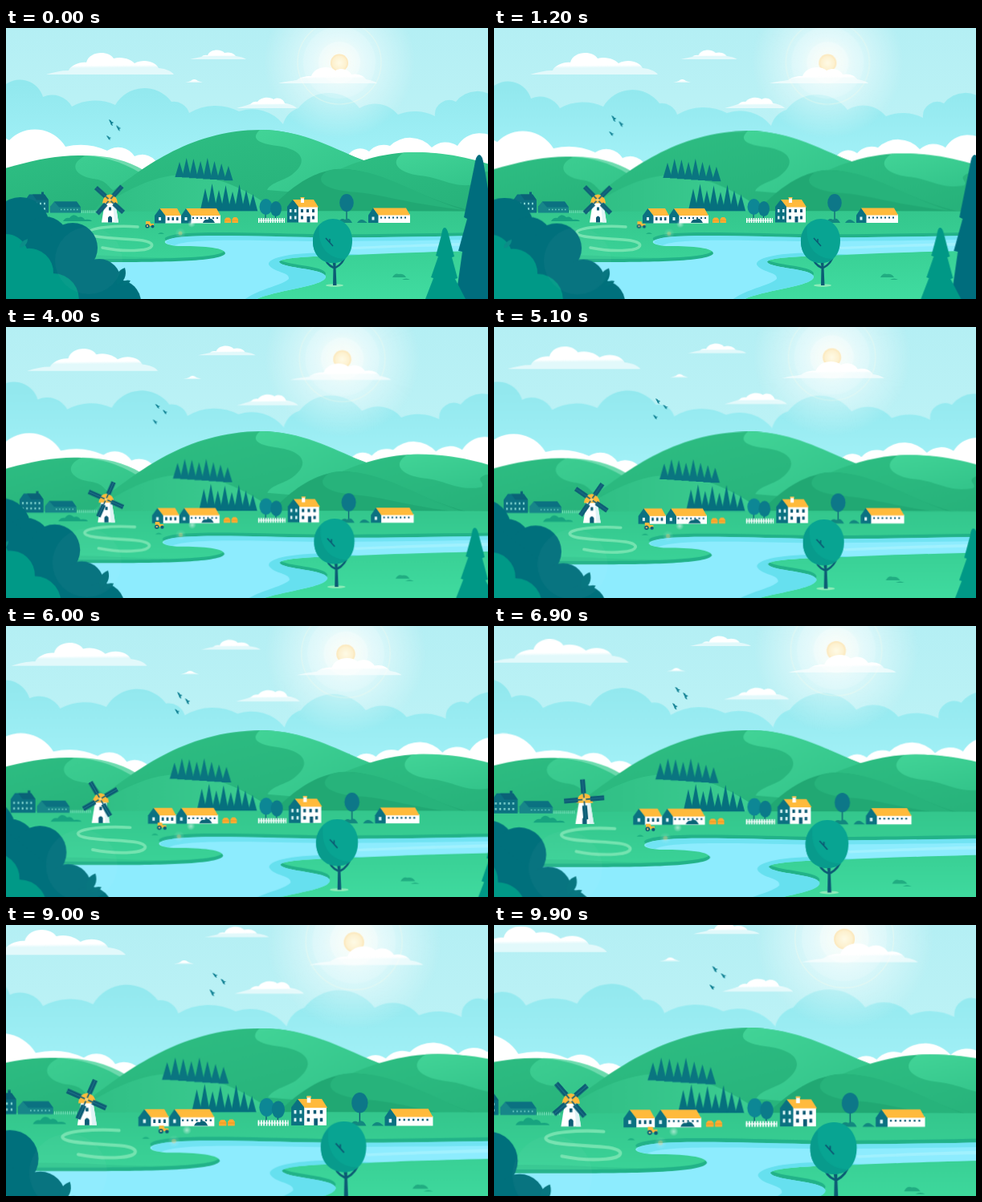
These frames come from a looping animation (600x338 px, 10 s). An HTML page:

```html
<!DOCTYPE html>
<html lang="en">
<head>
<meta charset="utf-8">
<title>Countryside by the river</title>
<style>
html, body { margin: 0; width: 100%; height: 100%; overflow: hidden; background: #b9f1f5; }
svg { display: block; width: 100%; height: 100%; }

/* camera: rest, accelerate, then a steady push-in; the .d layers add a linear parallax */
.cam { animation: zoom 10s infinite linear; }
.d { animation: drift 10s infinite linear; }
.mill { animation: spin 5s infinite linear; }
.bird { animation: flap .6s infinite alternate ease-in-out; }
@keyframes zoom {
  0%, 24% { transform: translate(0, 0) scale(1); }
  24% { animation-timing-function: cubic-bezier(.333, 0, .667, .333); }
  55% { transform: translate(-14.9px, -9.1px) scale(1.047); }
  100% { transform: translate(-58px, -35.6px) scale(1.183); }
}
@keyframes drift {
  from { transform: translate(0, 0); }
  to { transform: translate(var(--x, 0px), var(--y, 0px)); }
}
@keyframes spin {
  from { transform: rotate(42deg); }
  to { transform: rotate(-318deg); }
}
@keyframes flap {
  from { transform: scaleY(1); }
  to { transform: scaleY(.65); }
}
.teal { fill: #0b7181; }
.navy { fill: #0c5b74; }
.roof { fill: #ffba3c; }
.white { fill: #fff; }
.win { stroke: #0c5b74; fill: none; }
</style>
</head>
<body>
<svg viewBox="0 0 600 338" preserveAspectRatio="xMidYMid slice">
<defs>
  <linearGradient id="sky" x2="0" y2="1"><stop stop-color="#b4eff4"/><stop offset="1" stop-color="#c9f7f8"/></linearGradient>
  <linearGradient id="far" gradientUnits="userSpaceOnUse" y1="70" x2="0" y2="175"><stop stop-color="#92e8ee"/><stop offset="1" stop-color="#a4f2f8"/></linearGradient>
  <linearGradient id="hill" x2="1" y2="1"><stop stop-color="#2fc084"/><stop offset="1" stop-color="#23ab76"/></linearGradient>
  <linearGradient id="lit" x2="1" y2="1"><stop stop-color="#42d497"/><stop offset="1" stop-color="#30c188"/></linearGradient>
  <linearGradient id="low" x2="1" y2="0"><stop stop-color="#2dbb82"/><stop offset="1" stop-color="#3fd094"/></linearGradient>
  <linearGradient id="land" gradientUnits="userSpaceOnUse" y1="229" x2="0" y2="338"><stop stop-color="#34c78d"/><stop offset="1" stop-color="#40dca0"/></linearGradient>
  <linearGradient id="puff" x2=".06" y2="1"><stop offset=".6" stop-color="#fff"/><stop offset=".72" stop-color="#fff" stop-opacity=".6"/></linearGradient>
  <radialGradient id="glow"><stop stop-color="#fffdf0" stop-opacity=".95"/><stop offset=".35" stop-color="#fff" stop-opacity=".55"/><stop offset="1" stop-color="#fff" stop-opacity="0"/></radialGradient>
  <radialGradient id="disc"><stop stop-color="#fffbe6"/><stop offset=".75" stop-color="#fdf1cf"/><stop offset="1" stop-color="#fce6b8"/></radialGradient>
  <radialGradient id="spark"><stop stop-color="#fff" stop-opacity=".55"/><stop offset="1" stop-color="#fff" stop-opacity="0"/></radialGradient>
  <path id="bird" fill="#0f7f92" d="M-3-4Q0-3 .5-1Q2-1 3 0Q1 .5 1 1.500L2 4Q-1 3-1 .5Q-2-1-3-4Z"/>
  <path id="river" d="M700 257L600 259C520 260 440 262 380 261C320 260 250 257 215 261C192 264 192 270 215 272C240 272 272 273 273 281C270 291 200 292 130 292L40 292V400H290L312 338C340 326 398 322 398 310C396 300 345 300 340 292C340 284 420 284 480 281Q540 279 700 275Z"/>
</defs>

<rect width="600" height="338" fill="url(#sky)"/>

<g class="cam">
  <g class="d" style="--y:17px" fill="url(#far)">
    <path d="M-40 260V80A30 30 0 0 1 0 70A30 30 0 0 1 46 86A28 28 0 0 1 82 98A60 60 0 0 1 136 96A42 42 0 0 1 206 92A20 20 0 0 1 228 106A64 64 0 0 1 290 104A50 50 0 0 1 345 120L400 260Z"/>
    <path d="M300 260L345 120A28 28 0 0 1 364 100A47.500 47.500 0 0 1 440 100A37 37 0 0 1 488 108A55 55 0 0 1 534 110A18 18 0 0 1 560 92A34 34 0 0 1 612 90A34 34 0 0 1 660 110V260Z"/>
  </g>

  <g class="d" style="--x:3px;--y:1px">
    <circle cx="415" cy="43" r="95" fill="url(#glow)"/>
    <circle cx="415" cy="43" r="45" fill="#fff" opacity=".14"/>
    <circle cx="415" cy="43" r="52" fill="none" stroke="#fffbe8" stroke-opacity=".3" stroke-width="1.200"/>
    <circle cx="415" cy="43" r="26" fill="#fff" opacity=".25"/>
    <circle cx="415" cy="43.500" r="11" fill="url(#disc)"/>
  </g>

  <g fill="url(#puff)">
    <path class="d" style="--x:-42px" d="M50 58C60 55 68 53 78 53C80 47 92 42 100 43C104 28 128 28 134 38C146 35 156 40 160 44C172 38 186 42 190 50C200 51 206 54 209 58Z"/>
    <path class="d" style="--x:34px" d="M339 69C350 66 356 66 362 65C368 60 376 60 380 60C384 48 402 46 410 53C420 48 428 54 430 58C438 56 446 60 448 64C455 65 460 67 462 69Z"/>
    <path class="d" style="--x:30px" d="M229 39Q238 37 243 36Q246 33 251 34C254 26 268 26 272 31C280 29 285 33 286 35Q295 36 299 39Z"/>
    <path d="M223 68Q228 67 230 66Q234 62 239 66L245 68Z"/>
    <path class="d" style="--x:2px" d="M287 100Q298 97 304 95Q308 91 313 92C318 85 330 86 333 89C340 85 346 90 347 94Q357 95 362 100Z"/>
  </g>

  <g class="d white" style="--y:18px">
    <path d="M-40 260V150A30 30 0 0 1 4 140A44.500 44.500 0 0 1 74 148A80 80 0 0 1 126 153A24 24 0 0 1 160 160A22 22 0 0 1 190 172L260 260Z"/>
    <path d="M400 260L425 160A18 18 0 0 1 452 154A24 24 0 0 1 478 147A36 36 0 0 1 530 149A26 26 0 0 1 562 147A32 32 0 0 1 616 145A30 30 0 0 1 660 160V260Z"/>
  </g>

  <g class="d" style="--x:152px;--y:-42px">
    <g transform="translate(131 118)"><use href="#bird" class="bird"/></g>
    <g transform="translate(140 125)"><use href="#bird" class="bird" style="animation-delay:-.25s"/></g>
    <g transform="translate(128 137)"><use href="#bird" class="bird" style="animation-delay:-.4s"/></g>
  </g>

  <g class="d" style="--y:11.500px">
    <path fill="url(#hill)" d="M-60 260V196C-20 180 40 159 90 159C145 159 190 185 250 260Z"/>
    <path fill="url(#lit)" opacity=".75" d="M100 159C78 168 84 184 108 188C135 191 120 205 160 212L225 232C195 184 155 159 100 159Z"/>
    <path fill="url(#hill)" d="M80 260L130 205C165 180 225 127 318 127C365 127 405 150 440 163C480 178 520 210 580 260Z"/>
    <path fill="url(#lit)" d="M316 127C304 138 314 144 338 147C372 152 375 168 357 182C348 190 330 192 325 202L420 210 452 168C410 152 372 127 316 127Z"/>
    <path fill="url(#hill)" d="M370 260L395 186C430 167 470 155 508 155C555 155 600 170 680 195V260Z"/>
    <path fill="url(#lit)" d="M495 155.500C475 168 490 181 515 184C545 187 555 200 585 195C592 190 575 186 590 180Q610 177 630 180C585 163 545 153 495 155.500Z"/>
    <path fill="#21a873" d="M300 260C350 195 385 176 420 176C470 178 520 217 590 230V260Z"/>
    <path fill="#27b37b" d="M400 178C380 192 400 203 438 205C470 208 495 218 570 227C515 211 470 177 420 176Q410 175 400 178Z"/>
  </g>

  <g class="d" style="--y:4px">
    <path fill="url(#low)" d="M80 250C140 205 180 184 220 183C270 184 310 205 365 250Z"/>
    <g id="frontPines" fill="#06707e"></g>
  </g>
  <g class="d" style="--y:8px" id="rearPines" fill="#0a7580"></g>

  <path fill="url(#land)" d="M-60 230Q270 227 660 229V420H-60Z"/>
  <path fill="#2fc08b" opacity=".5" d="M40 292H130C200 292 268 291 273 281Q230 290 130 284Q80 282 40 284Z"/>

  <!-- left farm -->
  <g transform="translate(-2 1.500)">
    <path class="teal" d="M26 229V213L31 206H50L55 213V229Z"/>
    <path fill="#0a6277" d="M40 213L35 206H50L55 213ZM46 203h3v5h-3Z"/>
    <path d="M29 217.500H54M29 224H54" stroke="#7fd3cf" stroke-width="2.500" stroke-dasharray="2 3" fill="none"/>
    <path fill="#178689" d="M57 229V221L62 215H90L95 222V229Z"/>
    <path class="teal" d="M62 215H90L95 222H68Z"/>
    <path d="M70 225H93" stroke="#6fcdc6" stroke-width="1.500" stroke-dasharray="1.500 2.500"/>
    <path d="M96 227.500H120" stroke="#7ddfbd" stroke-width="3.500" stroke-dasharray="1 1.300"/>
  </g>
  <path fill="#17a37f" d="M71 241Q74 236 79 237Q84 230 90 236Q95 234 98 239Q105 238 107 241Z"/>

  <!-- windmill -->
  <g transform="translate(-1 .5)">
    <path class="white" d="M120 242L124 217H137L141 242Z"/>
    <path fill="#dff3f5" d="M134 217H137L141 242H136Z"/>
    <path class="roof" d="M121 218Q122 208 130.500 207Q139 208 140 218Z"/>
    <path class="navy" d="M128 242V236Q130.500 232 133 236V242ZM129 223h3v4h-3Z"/>
    <g transform="translate(130 214)">
      <g class="mill" id="blades"></g>
      <circle r="2" fill="#ffcf6c"/>
    </g>
  </g>

  <path fill="none" stroke="#7fe7b6" stroke-width="3.500" stroke-linecap="round" opacity=".85" d="M164 248C138 246 104 249 103 255C103 263 150 262 170 265C188 268 184 276 166 277Q145 279 120 274"/>

  <!-- village -->
  <g transform="translate(0 1)">
    <g id="barns"></g>
    <path class="win" stroke-width="4" stroke-dasharray="2.500 3" d="M201 237H217"/>
    <path class="win" stroke-width="2" stroke-dasharray="2 3" d="M232 236H265M466 235.500H501"/>
    <path fill="#0a6477" d="M245 242Q247 237 251 238Q256 234 260 242Z"/>
    <path fill="#ffac32" d="M272 242V238L274 235.500H278L280 238V242ZM281.500 242V237.500L283.500 235H287L289 237.500V242Z"/>
    <path stroke="#e0921e" stroke-width=".7" d="M272 239H280M281.500 239H289"/>

    <g stroke="#0c5b74" stroke-width="1.200"><path d="M323 225V241M335.500 225V241M424 215V241"/></g>
    <ellipse cx="323.500" cy="222" rx="8" ry="10" fill="#0d8795"/>
    <ellipse cx="336" cy="224.500" rx="7" ry="9.500" fill="#0b7b8a"/>
    <ellipse cx="424" cy="217" rx="8.800" ry="11" fill="#0d7788"/>
    <path stroke="#fff" stroke-width="6" stroke-dasharray="1.600 1.300" d="M314 239H347"/>
    <path stroke="#fff" d="M314 239H347"/>
    <path fill="#12877f" d="M413 242Q417 235 422 238Q427 234 431 242ZM437 242Q441 236 446 239L450 242Z"/>
    <path class="teal" d="M350 241.500V222L357 213 365 222V241.500Z"/>
    <path class="white" d="M364 221H388V241.500H364Z"/>
    <path class="roof" d="M357 213H383L389 222.500H364.500Z"/>
    <path class="white" d="M367 210h4v7h-4Z"/>
    <path class="roof" d="M366.500 210h5v1.500h-5Z"/>
    <path stroke="#d9f4f5" stroke-width="4" stroke-dasharray="2.500 3.500" d="M353 227H363M353 235.500H363"/>
    <path class="win" stroke-width="4" stroke-dasharray="3 4" d="M367 227H387M367 235.500H374M381 235.500H387"/>
    <path class="navy" d="M374.500 234h4v7.500h-4Z"/>
  </g>

  <!-- tractor -->
  <g class="d" style="--x:37px;--y:2px">
    <path class="roof" d="M174 245V241H179L180 244H184V247H174Z"/>
    <circle class="navy" cx="176" cy="247" r="2.600"/><circle class="navy" cx="182.500" cy="247.500" r="2"/>
    <circle fill="#ffd982" cx="176" cy="247" r="1"/>
  </g>
  <path fill="#1fb182" d="M189 257Q193 253 197 257Z"/>

  <!-- river -->
  <use href="#river" y="-4" fill="#22b288"/>
  <use href="#river" fill="#8decfe"/>
  <g fill="#66e0ef">
    <path d="M440 283C370 276 325 285 327 295C332 305 354 304 352 313C340 324 302 326 286 350H306L312 338C340 326 398 322 398 310C396 300 345 300 340 292C340 286 390 284 440 283Z"/>
    <path opacity=".7" d="M700 257L600 259C520 260 440 262 380 261C320 260 250 257 215 261C196 264 194 269 210 271C230 262 300 265 380 266Q500 266 700 262Z"/>
  </g>
  <path fill="#aaf4ff" opacity=".7" d="M700 266C600 266 500 270 430 273L432 276C520 272 600 271 700 270Z"/>
  <path fill="#21ac81" d="M481 311Q484 305 489 307Q495 306 498 311ZM493 314Q498 311 503 314Z"/>

  <!-- near tree -->
  <g transform="translate(2 2)">
    <ellipse cx="407" cy="319" rx="11" ry="1.800" fill="#8cebb8"/>
    <path d="M405 319L405.500 296 403.500 284H408.500L408.500 296 409.500 319Z" class="navy"/>
    <path fill="none" stroke="#0c5b74" stroke-width="2.500" d="M394 281Q396 293 406 297M421 280Q418 292 408 297"/>
    <path fill="#08a492" d="M405 236C419 236 429 248 429 263C429 281 419 291 405 291C391 291 380 281 380 264C380 248 391 236 405 236Z"/>
    <path fill="#089b8c" d="M388 245C381 251 380 258 380 264C380 281 391 291 405 291Q414 291 420 286C399 286 385 270 388 245Z"/>
    <path fill="none" stroke="#0c5b74" stroke-width="1.500" d="M396 260L405 270M401 265L401 261"/>
  </g>

  <!-- conifers -->
  <g class="d" style="--x:78px">
    <path fill="#006d7d" d="M589 158Q593 158 595 172L606 235 602 236 613 280 609 281 624 420H548L568 279 563 278 574 238 570 236 583 172Q585 158 589 158Z"/>
    <path fill="#009886" d="M546 249Q549 249 551 258L558 285 555 286 562 312 559 313 572 338 580 420H508L522 338 532 312 529 311 538 285 535 284 542 258Q543 249 546 249Z"/>
  </g>

  <!-- near bushes -->
  <g class="d" style="--x:-41px;--y:5px">
    <g fill="#00707c">
      <circle cx="18" cy="247" r="36"/>
      <circle cx="48" cy="265" r="30"/>
      <circle cx="83" cy="274" r="31"/>
      <circle cx="116" cy="315" r="27"/>
      <circle cx="140" cy="342" r="28"/>
      <path d="M-60 225L20 230 95 290 150 345V420H-60Z"/>
    </g>
    <path fill="#009987" d="M-60 420V266A36 36 0 0 1 -2 257A28 28 0 0 1 26 275A30 30 0 0 1 59 306A32 32 0 0 1 90 345V420Z"/>
    <path fill="#00727c" d="M138 320C135 308 140 302 148 299C151 309 147 317 138 320ZM141 321Q146 313 155 315Q151 323 141 321Z"/>
    <path fill="#0b8d88" d="M17 274Q17 266 27 263Q27 272 17 274Z"/>
  </g>

  <!-- lens flare -->
  <g class="d" style="--x:7px;--y:4px">
    <circle cx="103" cy="290" r="42" fill="#fff" opacity=".03"/>
    <circle cx="231" cy="244" r="5" fill="url(#spark)"/>
    <circle cx="217" cy="256" r="7" fill="url(#spark)" opacity=".4"/>
    <circle cx="217" cy="256" r="2.500" fill="#ffc46b" opacity=".3"/>
  </g>
</g>
</svg>
<script>
const $ = id => document.getElementById(id);

// row of pines: evenly spaced, one tip height each; the ground falls by slope per tree
function pines(id, x, gap, base, slope, half, tips) {
  $(id).innerHTML = tips.map((tip, i) => {
    const cx = x + gap * i, foot = base + slope * i;
    return `<path d="M${cx - half} ${foot}L${cx} ${tip}L${cx + half} ${foot}Z"/>`;
  }).join('');
}
pines('rearPines', 216, 8.7, 186, .6, 5.6, [167, 162, 163, 166, 162, 166, 169, 172]);
pines('frontPines', 248, 8.5, 229, .3, 6.5, [200, 194, 202, 196, 204, 195, 202, 207]);

// long barn: dark gable on the left, roof and white wall to the right
const barn = (x, gable, len, y) => `<g transform="translate(${x} ${y})">
  <path class="white" d="M${gable} 8H${len}V18.500H${gable}Z"/>
  <path class="teal" d="M0 18.500V9L${gable / 2} 0 ${gable + .5} 9V18.500Z"/>
  <path class="roof" d="M${gable / 2} 0H${len - 5}L${len} 9H${gable + .5}Z"/>
  <path fill="#d9f4f5" d="M${gable / 2 - 1.5} 11h3v4h-3Z"/></g>`;
$('barns').innerHTML = barn(185, 13, 33, 224) + barn(218, 12, 49, 224) + barn(451, 12, 52, 223.5);

$('blades').innerHTML = [0, 90, 180, 270].map(a =>
  `<g transform="rotate(${a})"><path d="M0 0V-8" stroke="#0c5b74" stroke-width="1.5"/><path class="navy" d="M-2.8-7H2.800V-23H-2.800Z"/><path d="M0-7V-23" stroke="#2a7f95" stroke-width=".6"/></g>`
).join('');
</script>
</body>
</html>
```
